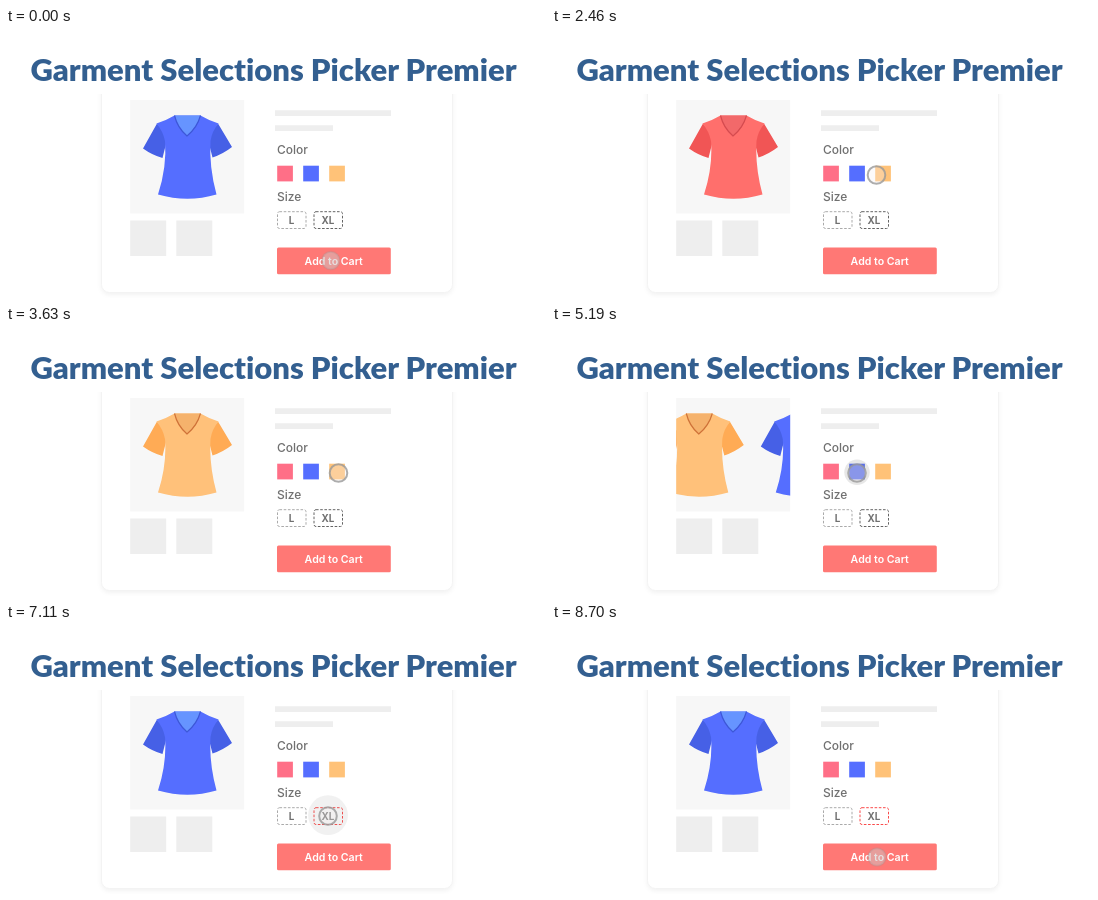
An HTML page for the animation above (8.88 s loop, 540x270 px).

```html
<!DOCTYPE html>
<html lang="en">
<head>
<meta charset="utf-8">
<title>Product options</title>
<style>
html, body { margin: 0; width: 100%; height: 100%; overflow: hidden; background: #fff; }
svg { display: block; width: 540px; height: 270px; }
text { font-family: Inter, "Open Sans", sans-serif; font-weight: 500; fill: #707070; }
.title { font: 900 31px Lato, "Open Sans", sans-serif; font-variant-ligatures: none; fill: #335f90; }
.card { fill: #fff; stroke: #f3f3f3; filter: drop-shadow(0 2px 2px #0000000d); }
.mid { text-anchor: middle; }
.size { font-size: 9.8px; font-weight: 700; }
.chip { fill: none; stroke-dasharray: 2.6 1.6; }
</style>
</head>
<body>
<svg viewBox="0 0 540 270">
  <defs>
    <clipPath id="window"><rect x="124.2" y="72" width="114" height="113.5"/></clipPath>
  </defs>
  <rect class="card" x="95.5" y="40" width="351" height="224.5" rx="8"/>
  <rect width="540" height="66" fill="#fff"/>
  <text class="title mid" x="267.5" y="53">Garment Selections Picker Premier</text>

  <rect x="124.2" y="72" width="114" height="113.5" fill="#f7f7f7"/>
  <g clip-path="url(#window)"><g id="shirts"></g></g>
  <path d="M124.2 192.5h36v35.500h-36zM170.300 192.500h36v35.500h-36zM269 82.300h116v5.700h-116zM269 97.300h58v5.700h-58z" fill="#eee"/>

  <text x="271" y="126" font-size="12">Color</text>
  <rect x="271.2" y="137.700" width="15.700" height="15.700" fill="#ff6f87"/>
  <rect x="297.2" y="137.700" width="15.700" height="15.700" fill="#556eff"/>
  <rect x="323.2" y="137.700" width="15.700" height="15.700" fill="#ffc278"/>

  <text x="271" y="173" font-size="12">Size</text>
  <rect class="chip" x="271.5" y="183.700" width="28.5" height="16.800" rx="2" stroke="#aaa"/>
  <rect class="chip" id="xl" x="308" y="183.700" width="28.5" height="16.800" rx="2"/>
  <text class="mid size" x="285.5" y="196">L</text>
  <text class="mid size" x="322" y="196">XL</text>

  <rect id="button" x="271" y="219.500" width="113.800" height="26.800" rx="1.500"/>
  <text class="mid" x="327.7" y="237" font-size="10.6" style="fill:#fff;font-weight:600">Add to Cart</text>

  <circle id="ripple" fill="#787878"/>
  <circle id="cursor" r="8.8" stroke="#999" stroke-width="2"/>
</svg>
<script>
const LOOP = 8880, STEP = 106;
const $ = id => document.getElementById(id);
const set = (id, attrs) => { for (const k in attrs) $(id).setAttribute(k, attrs[k]); };
const span = (t, from, to) => Math.min(1, Math.max(0, (t - from) / (to - from)));
const easeOut = u => 1 - (1 - u) ** 3;
const easeInOut = u => u < .5 ? 2 * u * u : 1 - 2 * (1 - u) ** 2;
const bump = u => Math.sin(Math.PI * u);
const mix = (a, b, u) => a + (b - a) * u;
const rgb = (a, b, u) => `rgb(${a.map((v, i) => Math.round(mix(v, b[i], u)))})`;

// body, sleeves, neck, neckline
const blue = ['#556eff', '#4660e6', '#6694ff', '#3d57d8'];
const red = ['#ff6f6c', '#f15555', '#f2696a', '#d54b4f'];
const orange = ['#ffc17a', '#ffab55', '#f5b26c', '#cf7238'];

$('shirts').innerHTML = [blue, red, orange, blue].map(([body, sleeve, neck, line], i) => `
  <g transform="translate(${i * STEP})">
    <path fill="${sleeve}" d="M151 95.5L137 120.500Q146 127 156.500 130L162 108ZM212 95.500L226 119Q217 126 206.500 129.500L201 108Z"/>
    <path fill="${body}" d="M168.500 87.500Q161 92 150.500 95.500Q157 103 159 113Q161 139 152 166.500Q181.500 175 210.500 166.500Q203 139 204.500 113Q206 103 212.500 95.500Q202 92 194.500 87.500Z"/>
    <path fill="${neck}" stroke="${line}" stroke-width="1.200" d="M168.500 87.500Q171.500 100 181 108Q191 100 194.500 87.500"/>
  </g>`).join('');

// start, end, x, y
const moves = [
  [0, 600, 279, 147],
  [2250, 2700, 332.5, 147],
  [4200, 4650, 305, 147],
  [6000, 6450, 322, 192],
  [7350, 7800, 325, 233],
];
const slides = [775, 3000, 4950];
const clicks = [[750, 1530], [2850, 3630], [4800, 5550], [7950, 8700]];

function draw(t) {
  let x = 325, y = 233;
  for (const [from, to, nx, ny] of moves) {
    const u = easeOut(span(t, from, to));
    x = mix(x, nx, u);
    y = mix(y, ny, u);
  }
  const overButton = span(y, 210, 228);
  set('cursor', {
    cx: x, cy: y,
    fill: rgb([245, 240, 240], [205, 195, 195], overButton),
    'fill-opacity': mix(.3, .5, overButton),
    'stroke-opacity': mix(.8, .25, overButton),
  });

  let r = 9, alpha = 0;
  for (const [from, to] of clicks) {
    const s = bump(span(t, from, to));
    r += 3.7 * s;
    alpha += .18 * s;
  }
  const tap = span(t, 6660, 7230);
  if (tap > 0 && tap < 1) {
    r = 9 + 11 * easeOut(tap);
    alpha = Math.min(.25, .5 * (1 - tap));
  }
  set('ripple', { cx: x, cy: y - .8, r, 'fill-opacity': alpha });

  const offset = slides.reduce((sum, s) => sum + easeInOut(span(t, s, s + 600)), 0);
  set('shirts', { transform: `translate(${-STEP * offset})` });
  set('xl', { stroke: rgb([100, 100, 100], [250, 75, 75], span(t, 6660, 6960)) });
  set('button', { fill: rgb([255, 120, 117], [235, 96, 94], bump(span(t, 7950, 8700))) });
}

const start = performance.now();
function tick() {
  draw((performance.now() - start) % LOOP);
  requestAnimationFrame(tick);
}
tick();
</script>
</body>
</html>
```
